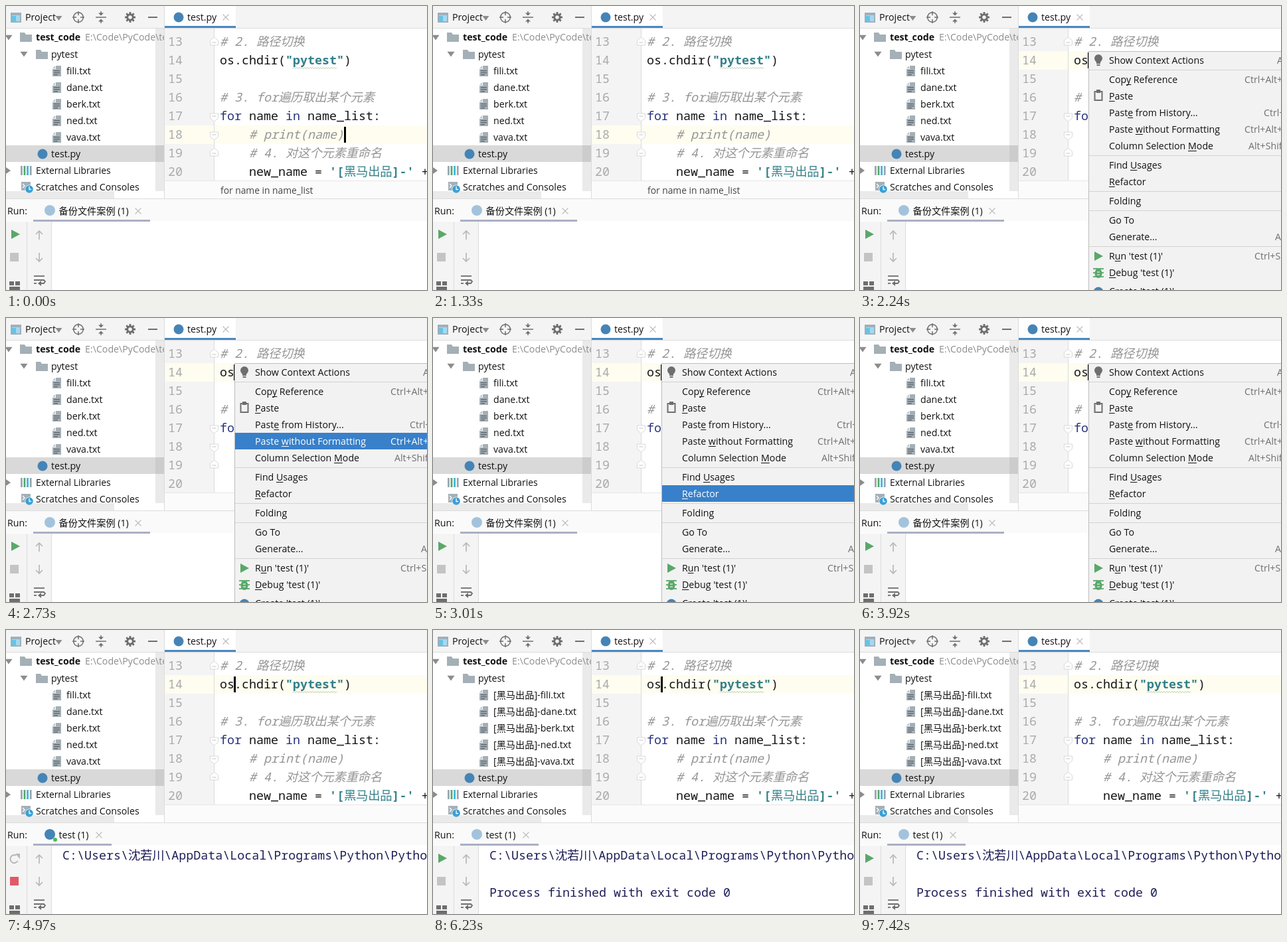
An HTML page with a canvas that plays this animation: 634 by 428 pixels, repeating every 7560 ms.

```html
<!DOCTYPE html>
<html lang="zh">
<head>
<meta charset="utf-8">
<title>test.py</title>
<style>
html, body { margin: 0; width: 100%; height: 100%; overflow: hidden; background: #fff; }
canvas { display: block; width: 634px; height: 428px; }
</style>
</head>
<body>
<canvas id="stage" width="634" height="428"></canvas>
<script>
const c = document.getElementById('stage').getContext('2d');
const LOOP = 7560, STEP = 70;
const UI = '"Open Sans", "Noto Sans CJK SC", "Noto Sans CJK", sans-serif';
const MONO = '"Noto Sans Mono", "Noto Sans CJK SC", "Noto Sans CJK", monospace';
const CELL = 11, WIDE = 18.1;
const GREY = '#6e6e6e', PANEL = '#f4f4f4', LINE = '#dcdcdc', PY = '#4584b6';

// Moments in ms
const OPEN = 2100, CLOSE = 4480, TAB = 4690, START = 4760, PATH = 4900,
  DONE = 5180, IDLE = 5250, RENAME = 5460, CARET_OFF = 6650;
const HOVER = [[2450, 0], [2520, 1], [2590, 2], [2660, 3], [2730, 4], [2800, 5], [2870, 6],
  [3010, 7], [3150, 8], [3220, 9], [3570, 10], [3850, -1], [3990, 11]];

const FILES = ['fili', 'dane', 'berk', 'ned', 'vava'];
const PREFIX = '[黑马出品]-';

// label, row centre, mnemonic index, shortcut, shortcut x
const MENU = [
  ['Show Context Actions', 82, -1, 'Alt+Enter', 628],
  ['Copy Reference', 111, 3, 'Ctrl+Alt+Shift+C', 579],
  ['Paste', 136, 0, '', 0],
  ['Paste from History...', 161, 4, 'Ctrl+Shift+V', 608],
  ['Paste without Formatting', 186, 6, 'Ctrl+Alt+Shift+V', 579],
  ['Column Selection Mode', 211, 17, 'Alt+Shift+Insert', 585],
  ['Find Usages', 240, 5, '', 0],
  ['Refactor', 265, 0, '', 0],
  ['Folding', 294, -1, '', 0],
  ['Go To', 323, -1, '', 0],
  ['Generate...', 348, -1, 'Alt+Insert', 625],
  ["Run 'test (1)'", 377, 1, 'Ctrl+Shift+F10', 594],
  ["Debug 'test (1)'", 402, 0, '', 0],
  ["Create 'test (1)'...", 430, -1, '', 0]
];

function box(x, y, w, h, color) {
  c.fillStyle = color;
  c.fillRect(x, y, w, h);
}
function path(points, color, width = 1.5, close = false) {
  c.beginPath();
  points.forEach(([x, y], i) => i ? c.lineTo(x, y) : c.moveTo(x, y));
  if (close) c.closePath();
  c.strokeStyle = color;
  c.lineWidth = width;
  c.stroke();
}
function poly(points, color) {
  c.beginPath();
  points.forEach(([x, y]) => c.lineTo(x, y));
  c.fillStyle = color;
  c.fill();
}
function disc(x, y, r, color) {
  c.beginPath();
  c.arc(x, y, r, 0, 7);
  c.fillStyle = color;
  c.fill();
}
function ring(x, y, r, color, width, from = 0, to = 7) {
  c.beginPath();
  c.arc(x, y, r, from, to);
  c.strokeStyle = color;
  c.lineWidth = width;
  c.stroke();
}
function text(s, x, y, color = '#111', size = 14.2, weight = '') {
  c.font = `${weight} ${size}px ${UI}`;
  c.fillStyle = color;
  c.fillText(s, x, y);
}
// Monospaced text on a fixed grid; Chinese is thinner and takes wider cells
function code(s, x, y, color = '#141414', slant = '', weight = 400) {
  c.fillStyle = color;
  for (const run of s.match(/[\u4e00-\u9fff]|[^\u4e00-\u9fff]+/g)) {
    const wide = run > '\u4e00';
    c.font = `${slant} ${wide ? 300 : weight} 18.33px ${MONO}`;
    c.fillText(run, x, y);
    x += wide ? WIDE : run.length * CELL;
  }
  return x;
}
function cross(x, y) {
  path([[x - 4.5, y - 4.5], [x + 4.5, y + 4.5]], '#c0c0c0', 1.2);
  path([[x + 4.5, y - 4.5], [x - 4.5, y + 4.5]], '#c0c0c0', 1.2);
}
function folder(x, y) {
  poly([[x - 9, y - 7], [x - 2, y - 7], [x, y - 4], [x + 9, y - 4], [x + 9, y + 7], [x - 9, y + 7]], '#a4afb6');
}
function sheet(x, y) {
  poly([[x - 1, y - 8], [x + 7, y - 8], [x + 7, y + 8], [x - 6, y + 8], [x - 6, y - 3], [x - 1, y - 3]], '#a4afb6');
  poly([[x - 6, y - 4], [x - 2, y - 8], [x - 2, y - 4]], '#b9c2c8');
  for (const d of [0, 3, 6]) box(x - 4, y + d - 1, d > 5 ? 6 : 9, 1.3, '#5b646a');
}
function triDown(x, y, r = 5) {
  poly([[x - r, y - r * .6], [x + r, y - r * .6], [x, y + r * .8]], '#8c8c8c');
}
function play(x, y) {
  poly([[x - 6, y - 7], [x + 7, y], [x - 6, y + 7]], '#59a869');
}
function fold(y, up) {
  const k = up ? -1 : 1;
  const p = [[307.5, y - 5 * k], [319.5, y - 5 * k], [319.5, y + 2 * k], [313.5, y + 7 * k], [307.5, y + 2 * k]];
  poly(p, '#fff');
  path(p, '#d8d8d8', 1, true);
  path([[310.5, y - k], [316.5, y - k]], '#c4c4c4', 1);
}

function projectHeader() {
  box(0, 0, 238, 34, PANEL);
  box(7, 10, 16, 15, '#9fb0ba');
  box(9, 14, 12, 9, '#a5d8ef');
  box(9, 15, 6, 8, '#66c2e6');
  text('Project', 29, 22);
  triDown(79.5, 18);
  ring(109, 17, 7.3, GREY, 1.5);
  for (const [dx, dy] of [[1, 0], [-1, 0], [0, 1], [0, -1]])
    path([[109 + dx * 3, 17 + dy * 3], [109 + dx * 9, 17 + dy * 9]], GREY, 1.5);
  path([[135, 17], [151, 17]], GREY, 1.5);
  for (const k of [-1, 1]) {
    path([[143, 17 + k * 9], [143, 17 + k * 4]], GREY, 1.5);
    poly([[139, 17 + k * 6.5], [147, 17 + k * 6.5], [143, 17 + k * 2.5]], GREY);
  }
  for (let i = 0; i < 8; i++) {
    const a = i * Math.PI / 4;
    path([[187 + 4 * Math.cos(a), 17 + 4 * Math.sin(a)], [187 + 8 * Math.cos(a), 17 + 8 * Math.sin(a)]], GREY, 2.8);
  }
  ring(187, 17, 4.3, GREY, 3);
  box(214, 16, 14, 2, GREY);
  box(0, 33, 238, 1, LINE);
}

function tree(t) {
  c.save();
  c.beginPath();
  c.rect(0, 34, 238, 256);
  c.clip();
  box(0, 210, 238, 25, '#d9d9d9');
  triDown(4, 47, 5.5);
  folder(30, 47);
  text('test_code', 45, 52, '#111', 14.2, 'bold');
  text('E:\\Code\\PyCode\\test_code', 119, 52, '#8c8c8c');
  triDown(27, 72, 5.5);
  folder(54, 73);
  text('pytest', 68, 78);
  FILES.forEach((name, i) => {
    sheet(76, 98 + 25 * i);
    text((t >= RENAME ? PREFIX : '') + name + '.txt', 91, 103 + 25 * i);
  });
  disc(55, 223, 7.5, PY);
  text('test.py', 68, 228);
  poly([[0, 243], [7, 248], [0, 253]], '#8c8c8c');
  ['#9aa7b0', '#59a869', '#40b6e0', '#9aa7b0'].forEach((k, i) => box(22 + 4.6 * i, 241, 2.8, 14, k));
  text('External Libraries', 45, 253, '#111', 13.9);
  box(23, 265, 14, 13, '#a4afb6');
  path([[25, 268], [28, 271], [25, 274]], '#fff', 1.4);
  disc(35, 276, 6.5, '#fff');
  disc(35, 276, 5.8, '#389fd6');
  path([[35, 272], [35, 276.5], [38, 276.5]], '#fff', 1.3);
  text('Scratches and Consoles', 45, 278);
  box(225, 34, 13, 245, 'rgba(150,150,150,.2)');
  box(0, 279, 163, 11, 'rgba(150,150,150,.2)');
  c.restore();
  box(238, 0, 1, 290, LINE);
}

function caretOn(t) {
  if (t >= OPEN) return t < CARET_OFF;
  return t < 140 || (t >= 700 && t < 1260) || t >= 1750;
}

function editor(t) {
  const moved = t >= OPEN;
  box(239, 0, 395, 33, PANEL);
  box(239, 0, 107, 30, '#fff');
  box(239, 33, 395, 1, LINE);
  box(239, 30, 107, 3, '#4a88c0');
  disc(260, 17, 7.5, PY);
  text('test.py', 273, 22);
  cross(331, 17);

  box(239, 34, 75, 230, PANEL);
  box(239, moved ? 68 : 180, 395, 28, '#fefdf0');
  box(313, 34, 1, 230, LINE);
  for (let i = 0; i < 8; i++) code(String(13 + i), 244, 60 + 28 * i, '#aaa');
  fold(54, true);
  fold(167, false);
  fold(195, false);
  fold(221, true);

  const note = '#959595', key = '#27317c', str = '#33808a';
  code('# 2. 路径切换', 322, 60, note, 'italic');
  let x = code('os.chdir(', 322, 88);
  x = code('"pytest"', x, 88, str, '', 700);
  code(')', x, 88);
  const wave = [];
  for (let i = 0; i <= 33; i++) wave.push([432 + 2 * i, i % 2 ? 92.5 : 94.5]);
  path(wave, '#bcc5b3', 1);
  code('# 3. for遍历取出某个元素', 322, 144, note, 'italic');
  x = code('for', 322, 172, key);
  x = code(' name ', x, 172);
  x = code('in', x, 172, key);
  code(' name_list:', x, 172);
  code('# print(name)', 366, 200, note, 'italic');
  code('# 4. 对这个元素重命名', 366, 228, note, 'italic');
  x = code('new_name = ', 366, 256);
  x = code("'" + PREFIX + "'", x, 256, str, '', 700);
  code(' + name', x, 256);
  if (caretOn(t)) moved ? box(343, 70, 3, 24, '#000') : box(509, 182, 3, 24, '#000');

  box(239, 264, 395, 26, '#fbfbfb');
  box(239, 263, 395, 1, '#e6e6e6');
  if (!moved) text('for name in name_list', 323, 283, '#444', 13.8);
}

function runPanel(t) {
  const fresh = t >= TAB, busy = t >= START && t < IDLE;
  const right = fresh ? 159 : 217;
  box(0, 290, 634, 138, '#fff');
  box(0, 290, 634, 1, LINE);
  box(0, 291, 634, 33, '#fafafa');
  text('Run:', 2, 314);
  box(41, 322, right - 41, 3, '#aab0c4');
  disc(66, 308, 8, busy ? PY : '#a3c3dc');
  if (busy) disc(74, 316, 3, '#4fb860');
  text(fresh ? 'test (1)' : '备份文件案例 (1)', 79.5, 314);
  cross(fresh ? 140 : 199, 309);
  box(0, 325, 68, 103, PANEL);
  box(31, 325, 1, 103, LINE);
  box(68, 325, 1, 103, LINE);

  if (busy) {
    ring(12.5, 345, 6, '#b8b8b8', 2, .5, 5.2);
    poly([[14, 337], [21, 337], [21, 345]], '#b8b8b8');
  } else play(14, 344);
  box(6, 372, 13, 13, busy ? '#e05a66' : '#c4c4c4');
  box(5, 415, 7, 6, GREY);
  box(14, 415, 7, 6, GREY);
  box(5, 423, 16, 5, GREY);
  for (const [y, k] of [[345, -1], [379, 1]]) {
    path([[50, y - 7 * k], [50, y + 6 * k]], '#b8b8b8', 1.7);
    path([[45, y + k], [50, y + 6 * k], [55, y + k]], '#b8b8b8', 1.7);
  }
  path([[42, 407], [58, 407]], GREY, 1.8);
  path([[42, 413], [57, 413], [59, 415], [57, 418], [51, 418]], GREY, 1.8);
  poly([[53, 414], [53, 422], [48, 418]], GREY);
  path([[42, 418], [46, 418]], GREY, 1.8);

  const ink = '#1e1e58';
  if (t >= PATH) code('C:\\Users\\沈若川\\AppData\\Local\\Programs\\Python\\Python', 85, 346, ink);
  if (t >= DONE) code('Process finished with exit code 0', 85, 402, ink);
}

function menu(t) {
  let hot = -1;
  for (const [at, row] of HOVER) if (t >= at) hot = row;
  box(344, 68, 290, 360, '#bdbdbd');
  box(345, 69, 289, 359, '#f2f2f2');
  for (const y of [96, 225, 279, 308, 362]) box(345, y, 289, 1, '#d3d3d3');
  MENU.forEach(([label, y, mark, keys, kx], i) => {
    const on = i === hot, ink = on ? '#fff' : '#111';
    if (on) box(345, y - 13, 289, 25, '#3880c9');
    text(label, 375, y + 5, ink);
    if (mark >= 0) {
      const x = 375 + c.measureText(label.slice(0, mark)).width;
      box(x, y + 7, c.measureText(label[mark]).width, 1, ink);
    }
    if (keys) text(keys, kx, y + 5, on ? '#fff' : '#6f6f6f');
  });
  disc(359, 79, 6, GREY);
  box(356, 84, 6, 3, GREY);
  box(356.5, 88, 5, 2, GREY);
  c.strokeStyle = GREY;
  c.lineWidth = 2;
  c.strokeRect(353.5, 129, 11, 13);
  box(356, 126, 6, 5, GREY);
  play(359, 377);
  for (const d of [-5, 0, 5]) path([[351, 402 + d * 1.2], [367, 402 + d * 1.2]], '#59a869', 1.8);
  c.beginPath();
  c.ellipse(359, 403, 5.5, 7, 0, 0, 7);
  c.fillStyle = '#59a869';
  c.fill();
  path([[355, 395], [357, 398]], '#59a869', 1.6);
  path([[363, 395], [361, 398]], '#59a869', 1.6);
  path([[357, 401], [361, 401]], PANEL, 1.2);
  path([[357, 405], [361, 405]], PANEL, 1.2);
  disc(359, 431, 7.5, PY);
}

function draw(now) {
  const t = Math.floor(now % LOOP / STEP) * STEP;
  box(0, 0, 634, 428, '#fff');
  projectHeader();
  tree(t);
  editor(t);
  runPanel(t);
  if (t >= OPEN && t < CLOSE) menu(t);
}

let began;
function tick(now) {
  began ??= now;
  draw(now - began);
  requestAnimationFrame(tick);
}
draw(0);
requestAnimationFrame(tick);
</script>
</body>
</html>
```
